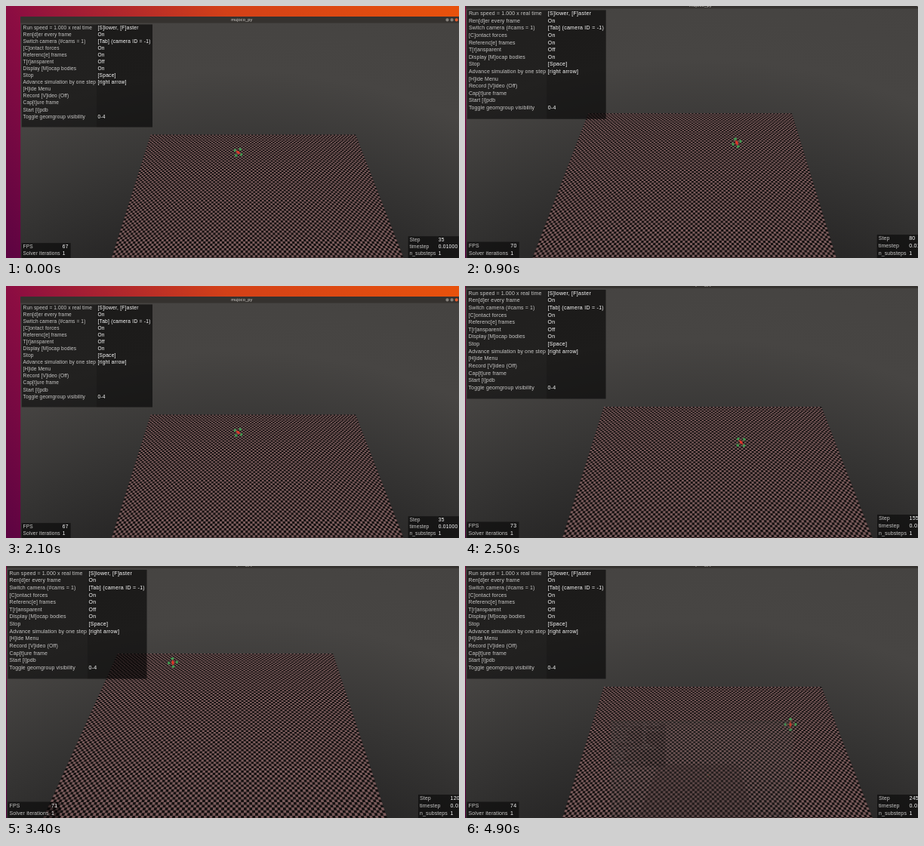
Write an HTML page with a canvas that moves like this. It is 600x334 px and loops after 5000 ms.

```html
<!DOCTYPE html>
<html lang="en">
<head>
<meta charset="utf-8">
<title>Drone simulation</title>
<style>
html, body { margin: 0; width: 100%; height: 100%; overflow: hidden; background: #333; }
canvas { display: block; }
</style>
</head>
<body>
<canvas id="stage" width="600" height="334"></canvas>
<script>
const ctx = document.getElementById('stage').getContext('2d');
const LOOP = 5000, TICK = 100, CELLS = 120;
const VANISH = { x: 313, y: -248 };

// Each flight: far floor edge, and drone waypoints as [step, x, y, radius, angle].
const flights = [
  { left: 184, right: 472, top: 160, fps: s => s < 50 ? 67 : 70 + s / 60,
    path: [[35, 307, 185, 6, 0.6], [65, 310, 203, 6, 0.35], [150, 362, 207, 6.5, 0.8], [245, 431, 210, 7.5, 1.57]] },
  { left: 163, right: 433, top: 142, fps: s => 68.6 + s / 55,
    path: [[50, 333, 178, 6, 0.7], [80, 360, 181, 6, 1.2], [110, 388, 184, 6, 1.5]] },
  { left: 148, right: 433, top: 116, fps: s => 68.6 + s / 55,
    path: [[60, 268, 148, 6, 0.7], [120, 221, 128, 6, 1.45], [240, 188, 122, 6, 1.6], [270, 183, 122, 6, 1.6]] }
];

const menu = [
  ['Run speed = 1.000 x real time', '[S]lower, [F]aster'],
  ['Ren[d]er every frame', 'On'],
  ['Switch camera (#cams = 1)', '[Tab] (camera ID = -1)'],
  ['[C]ontact forces', 'On'],
  ['Referenc[e] frames', 'On'],
  ['T[r]ansparent', 'Off'],
  ['Display [M]ocap bodies', 'On'],
  ['Stop', '[Space]'],
  ['Advance simulation by one step', '[right arrow]'],
  ['[H]ide Menu', ''],
  ['Record [V]ideo (Off)', ''],
  ['Cap[t]ure frame', ''],
  ['Start [i]pdb', ''],
  ['Toggle geomgroup visibility', '0-4']
];

function rect(x, y, w, h, fill) {
  ctx.fillStyle = fill;
  ctx.fillRect(x, y, w, h);
}

function withStops(gradient, stops) {
  for (const [at, color] of stops) gradient.addColorStop(at, color);
  return gradient;
}

function dot(x, y, rx, ry, fill) {
  ctx.fillStyle = fill;
  ctx.beginPath();
  ctx.ellipse(x, y, rx, ry, 0, 0, 7);
  ctx.fill();
}

function text(str, x, y, fill, spacing = 0.1) {
  ctx.letterSpacing = spacing + 'px';
  ctx.fillStyle = fill;
  ctx.fillText(str, x, y);
}

function rows(list, x, valueX, y) {
  list.forEach(([label, value], i) => {
    text(label, x, y + i * 9.62, '#c9c8c7', 0.12);
    text(value, valueX, y + i * 9.62, '#fff', 0.28);
  });
}

function drawFloor({ left, right, top }) {
  const depth = top - VANISH.y, width = right - left;
  const shrink = width / CELLS / 403 * 0.685;
  const scaleAt = v => 1 / (1 - shrink * v);
  const px = (u, k) => VANISH.x + (left + u * width / CELLS - VANISH.x) * k;
  const py = k => VANISH.y + depth * k;
  const quad = (u0, u1, k0, k1) => {
    ctx.moveTo(px(u0, k0), py(k0));
    ctx.lineTo(px(u1, k0), py(k0));
    ctx.lineTo(px(u1, k1), py(k1));
    ctx.lineTo(px(u0, k1), py(k1));
    ctx.closePath();
  };
  ctx.beginPath();
  quad(0, CELLS, 1, scaleAt(CELLS));
  ctx.fillStyle = '#151111';
  ctx.fill();
  ctx.beginPath();
  for (let v = 0; py(scaleAt(v)) < 340; v++)
    for (let u = v % 2; u < CELLS; u += 2) quad(u, u + 1, scaleAt(v), scaleAt(v + 1));
  ctx.fillStyle = '#785a5a';
  ctx.fill();
}

function pose(path, step) {
  const last = path.length - 1;
  if (step <= path[0][0]) return path[0];
  if (step >= path[last][0]) return path[last];
  const i = path.findIndex(p => p[0] > step);
  const a = path[i - 1], b = path[i], f = (step - a[0]) / (b[0] - a[0]);
  return a.map((n, j) => n + (b[j] - n) * f);
}

function drawDrone([, x, y, r, angle]) {
  ctx.save();
  ctx.translate(x, y);
  ctx.rotate(angle);
  for (let i = 0; i < 4; i++) {
    rect(0, -0.6, r, 1.2, i % 2 ? '#6b5a3a' : '#b0402c');
    dot(r - 0.6, 0, 1.5, 2.1, '#3f9c52');
    ctx.rotate(Math.PI / 2);
  }
  dot(0, 0, 2.6, 1.7, '#e0352b');
  ctx.restore();
}

function drawWindow(flight, step, scale, alpha) {
  ctx.save();
  ctx.globalAlpha = alpha;
  ctx.translate(316 * (1 - scale), 340 * (1 - scale));
  ctx.scale(scale, scale);
  ctx.beginPath();
  ctx.rect(1, -6, 619, 346);
  ctx.clip();

  // The sky darkens towards the point straight below the camera.
  rect(0, -6, 622, 346, withStops(ctx.createRadialGradient(312, 800, 466, 312, 800, 860),
    [[0, '#232222'], [0.34, '#353433'], [0.67, '#474543'], [1, '#454341']]));
  drawFloor(flight);
  drawDrone(pose(flight.path, step));

  ctx.font = '6px "Liberation Sans", Arial, sans-serif';
  ctx.textBaseline = 'middle';
  rect(0, -6, 622, 9, '#35322f');
  ctx.textAlign = 'center';
  text('mujoco_py', 312, -1.4, '#d8d4cf');
  ctx.textAlign = 'left';
  [601, 607.5, 614].forEach((x, i) => dot(x, -1.4, 2.2, 2.2, i < 2 ? '#85807a' : '#e95a2b'));

  ctx.font = '7px "Liberation Sans", Arial, sans-serif';
  const shade = 'rgba(0,0,0,0.52)';
  rect(2.5, 5, 184, 144.5, shade);
  rect(108, 5, 78.5, 144.5, 'rgba(0,0,0,0.16)');
  rows(menu, 4.5, 109.5, 9.8);

  rect(2.5, 312.5, 69, 21.5, shade);
  rows([['FPS', Math.round(flight.fps(step))], ['Solver iterations', 1]], 4.5, 60, 318);

  rect(546, 303, 72, 31, shade);
  const shown = Math.round(Math.min(step, 245));
  rows([['Step', shown], ['timestep', '0.01000'], ['n_substeps', 1]], 548, 588.5, 308.5);
  ctx.restore();
}

function drawDesktop() {
  rect(0, 0, 600, 334, withStops(ctx.createLinearGradient(0, 334, 600, 0),
    [[0, '#5c0342'], [0.24, '#8c0d42'], [0.6, '#d34018'], [1, '#e8520c']]));
}

// Two passes rest on their last pose; the third is cut short.
function localTime(t) {
  if (t < 2100) return Math.min(t, 1700);
  if (t < 4300) return Math.min(t - 2100, 1800);
  return t - 4200;
}

function draw(t) {
  const time = localTime(t);
  const index = time <= 700 ? 0 : time <= 1000 ? 1 : 2;
  const step = [35 + 0.3 * time, 80 + 0.3 * (time - 900), 120 + 0.3 * (time - 1300)][index];
  drawDesktop();
  drawWindow(flights[index], step, 1 - 0.058 * Math.exp((35 - step) / 12), 1);
  // The next window starts opening over the finished one.
  if (time === 700 || time === 1000) drawWindow(flights[index + 1], 5, 0.39, 0.2);
}

const start = performance.now();
let shownTick = -1;
function frame() {
  const tick = Math.floor((performance.now() - start) % LOOP / TICK);
  if (tick !== shownTick) draw((shownTick = tick) * TICK);
  requestAnimationFrame(frame);
}
frame();
</script>
</body>
</html>
```
